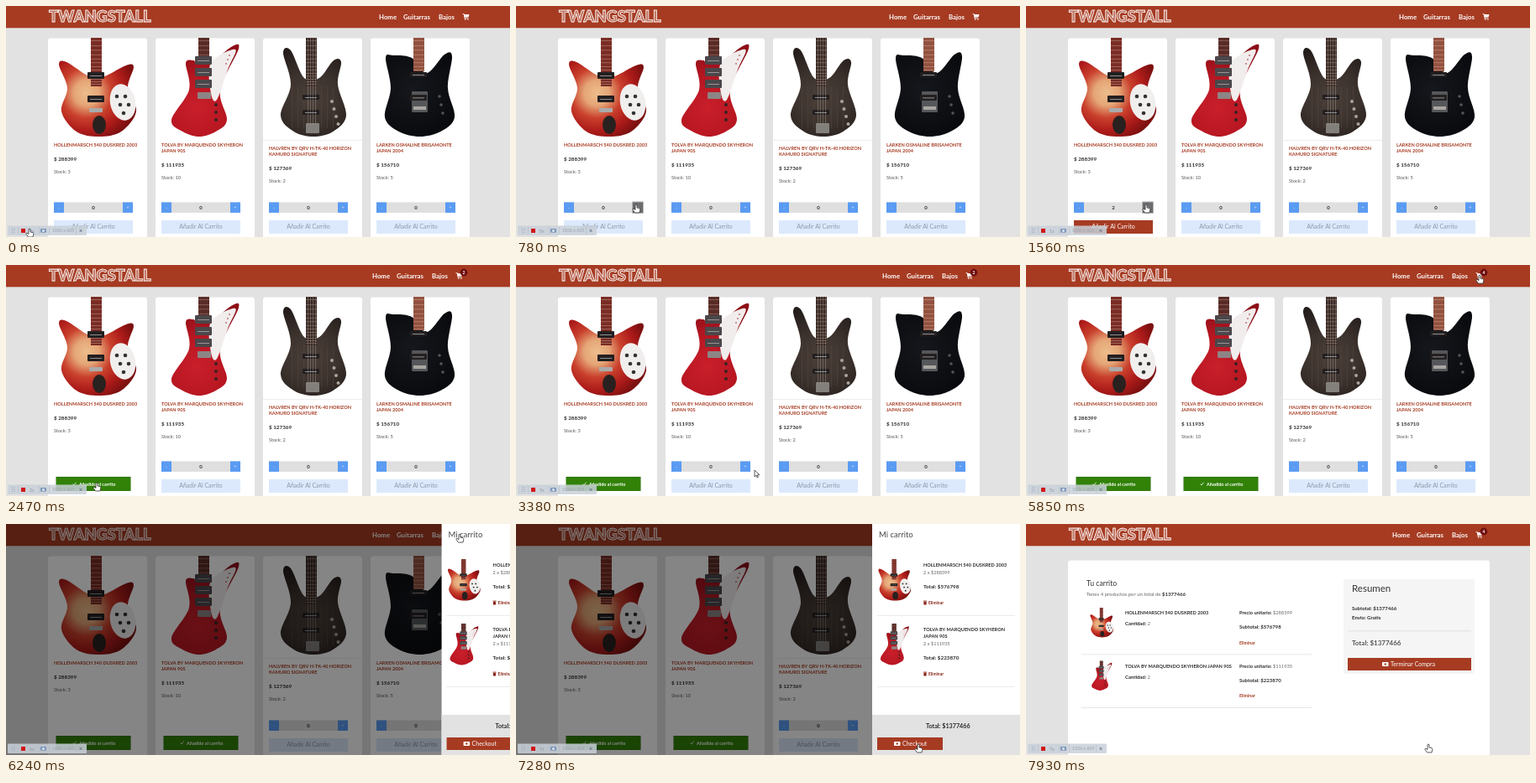
Recreate the animation shown at these times as an HTML page with a canvas. Size 600 by 276 pixels, loop 8 s.

```html
<!DOCTYPE html>
<html lang="es">
<head>
<meta charset="utf-8">
<title>Tienda</title>
<style>
html, body { margin: 0; width: 100%; height: 100%; overflow: hidden; background: #e2e2e2; }
canvas { display: block; width: 600px; height: 276px; }
</style>
</head>
<body>
<canvas id="stage"></canvas>
<script>
const W = 600, H = 276, LOOP = 8000, STEP = 130;
const RED = '#a63b22', BLUE = '#5a9bf2', INK = '#2b2b2b', GREY = '#666';
const OPEN = 6050, CHECKOUT = 7540, DRAWER_W = 176;

const canvas = document.getElementById('stage');
const c = canvas.getContext('2d');
const dpr = window.devicePixelRatio || 1;
canvas.width = W * dpr;
canvas.height = H * dpr;

const products = [
  { name: ['HOLLENMARSCH 540 DUSKRED 2003'], price: 288399, stock: 3, plus: [910, 1430], add: 2340 },
  { name: ['TOLVA BY MARQUENDO SKYHERON', 'JAPAN 90S'], price: 111935, stock: 10, plus: [3640, 3900], add: 4680 },
  { name: ['HALVREN BY QRV H-TK-40 HORIZON', 'KAMURO SIGNATURE'], price: 127369, stock: 2, drop: 4 },
  { name: ['LARKEN OSMALINE BRISAMONTE', 'JAPAN 2004'], price: 156710, stock: 5 }
];
const chosen = products.slice(0, 2);

// Pointer moves: start, end, x, y
const moves = [
  [130, 780, 143, 237], [1690, 2080, 108, 260], [2600, 3380, 284, 245],
  [3380, 3640, 272, 237], [4030, 4420, 255, 260], [4940, 5720, 540, 12],
  [6300, 7150, 479, 263]
];
const hand = new Path2D('M-1 .6Q0-.6 1 .6V4L4 4.6Q5 5 4.8 6.5L4 10H-1.5L-4 6.5Q-4.4 5-3 5.2L-1 6.5Z');
const arrow = new Path2D('M0 0V8L2 6.2L3.2 9L4.4 8.5L3.2 5.8H5.8Z');

const mix = (a, b, p) => a + (b - a) * p;

function ease(t, start, length) {
  const p = Math.min(1, Math.max(0, (t - start) / length));
  return p * p * (3 - 2 * p);
}

function rect(x, y, w, h, fill, r = 0) {
  c.fillStyle = fill;
  c.beginPath();
  c.roundRect(x, y, w, h, r);
  c.fill();
}

function oval(x, y, rx, ry, fill, turn = 0) {
  c.fillStyle = fill;
  c.beginPath();
  c.ellipse(x, y, rx, ry, turn, 0, 7);
  c.fill();
}

const dot = (x, y, r, fill) => oval(x, y, r, r, fill);

function dots(n, x, y, dx, dy, r, fill) {
  for (let i = 0; i < n; i++) dot(x + i * dx, y + i * dy, r, fill);
}

function text(s, x, y, size, fill = INK, weight = 400, align = 'left') {
  c.font = `${weight} ${size}px Lato, sans-serif`;
  c.textAlign = align;
  c.fillStyle = fill;
  c.fillText(s, x, y);
  return c.measureText(s).width;
}

function pair(label, value, x, y, size, fill = GREY, weight = 400) {
  const w = text(label + ' ', x, y, size, INK, 700);
  text(value, x + w, y, size, fill, weight);
}

// Closed smooth curve through points
function blob(pts, fill) {
  const at = i => pts[(i + pts.length) % pts.length];
  c.beginPath();
  c.moveTo(...pts[0]);
  pts.forEach((b, i) => {
    const a = at(i - 1), d = at(i + 1), e = at(i + 2);
    c.bezierCurveTo(b[0] + (d[0] - a[0]) / 6, b[1] + (d[1] - a[1]) / 6,
      d[0] - (e[0] - b[0]) / 6, d[1] - (e[1] - b[1]) / 6, ...d);
  });
  c.fillStyle = fill;
  c.fill();
}

// Guitar outline from its horns, waist, lower bout and neck heel
function body({ horns: [l, r], waist: [wl, wr, wy], bout: [bl, br, by], heel: [hl, hr] }, fill) {
  const base = 118, inset = (br - bl) * .2;
  blob([
    l, [wl, wy], [bl, by], [bl + inset, base - 6], [(bl + br) / 2, base],
    [br - inset, base - 6], [br, by], [wr, wy], r,
    [r[0] - 9, r[1] - 2], [67, hr], [49, hl], [l[0] + 9, l[1] - 3]
  ], fill);
}

function glow(x, y, r, ...colors) {
  const g = c.createRadialGradient(x, y, 0, x, y, r);
  colors.forEach((col, i) => g.addColorStop(i / (colors.length - 1), col));
  return g;
}

function neck(end, fill, fret) {
  rect(51, 0, 13, end, fill);
  for (let y = 3, gap = 6; y < end; y += gap, gap *= .94) rect(51, y, 13, .5, fret);
}

function pickup(y, h = 8, fill = '#231f20') {
  rect(47, y, 20, h, fill, 1);
  rect(50, y + h / 2, 14, .8, '#aaa');
}

const guitars = [
  () => {
    body({ horns: [[13, 32], [102, 35]], waist: [23, 95, 60], bout: [16, 105, 88], heel: [46, 46] },
      glow(46, 66, 60, '#edbd8b', '#e5a577', '#c9402c', '#ae1c1a', '#7d1010'));
    oval(89, 77, 15, 22, '#f1eeee', -.2);
    neck(58, '#7a2c25', '#c09a88');
    pickup(41);
    pickup(69);
    rect(49, 84, 16, 5, '#aaa', 1);
    oval(61, 104, 8, 11, '#29211f');
    dots(3, 82, 70, 4, 10, 2.3, '#333');
    dots(2, 92, 70, 4, 10, 2.3, '#333');
  },
  () => {
    body({ horns: [[36, 30], [99, 13]], waist: [40, 77, 62], bout: [19, 85, 98], heel: [29, 29] },
      glow(50, 84, 70, '#c91f2b', '#b81722', '#8d0e17'));
    blob([[66, 30], [95, 14], [86, 38], [73, 74], [66, 66]], '#f1eded');
    neck(26, '#5a2b26', '#a98a80');
    for (let y = 22; y < 60; y += 14) pickup(y, 10, '#4b474a');
    rect(50, 65, 16, 8, '#8d8585', 1);
    dots(3, 72, 80, 0, 9, 2, '#3a2222');
    dots(3, 88, 21, -2, 5, .9, '#b66');
  },
  () => {
    body({ horns: [[24, 18], [93, 29]], waist: [33, 89, 56], bout: [21, 99, 93], heel: [48, 48] },
      glow(57, 72, 62, '#4a3f39', '#3d332e', '#241d1b'));
    for (let x = 34; x < 90; x += 7) rect(x, 58, .6, 50, '#51453e');
    neck(58, '#3a2925', '#9b8a7d');
    pickup(68, 6);
    pickup(86, 6);
    rect(51, 102, 16, 12, '#83807c', 1);
    for (let x = 53; x < 64; x += 3) rect(x, 0, .4, 104, '#a59c92');
    dots(4, 82, 76, 2.5, 9, 2, '#aaa49c');
  },
  () => {
    body({ horns: [[18, 24], [97, 22]], waist: [24, 92, 60], bout: [17, 100, 95], heel: [24, 42] },
      glow(50, 62, 70, '#15171c', '#07080b'));
    neck(40, '#935241', '#d3a58a');
    pickup(41, 6);
    rect(49, 64, 19, 25, '#55575a', 1);
    pickup(68, 7);
    rect(51, 82, 15, 4, '#a9a7a2');
    dots(3, 82, 70, 2, 10, 1.8, '#53555a');
  }
];

function guitar(i, x, y, s = 1) {
  c.save();
  c.translate(x, y);
  c.scale(s, s);
  guitars[i]();
  c.restore();
}

function drawNav(t) {
  rect(0, 0, W, 26.3, RED);
  text('TWANGSTALL', 51, 19, 18.2, 'rgba(255,255,255,.3)', 900);
  c.strokeStyle = '#fff';
  c.lineWidth = .8;
  c.strokeText('TWANGSTALL', 51, 19);

  const count = chosen.filter(p => t >= p.add).length * 2;
  const x = count ? 436 : 444;
  text('Home', x, 15.5, 7.8, '#fff', 700);
  text('Guitarras', x + 29, 15.5, 7.8, '#fff', 700);
  text('Bajos', x + 71, 15.5, 7.8, '#fff', 700);
  c.save();
  c.translate(x + 99.5, 9);
  c.fillStyle = '#fff';
  c.fill(new Path2D('M0 0H1.8L2.1 1H8L7 4.6H2.9L3.1 5.4H7V6.2H2.3L1.2 .8H0Z'));
  dots(2, 3.2, 7, 3.2, 0, .8, '#fff');
  c.restore();
  if (count) {
    dot(545, 9, 4.4, '#6f0e10');
    text(count, 545, 10.8, 5, '#fff', 700, 'center');
  }
}

function drawAdded(x) {
  rect(x, 253, 89, 17, '#276a05');
  rect(x + .5, 253.5, 88, 16, '#318207');
  c.strokeStyle = '#fff';
  c.lineWidth = .8;
  c.stroke(new Path2D(`M${x + 20} 261.6l1.4 1.5 2.6-3.4`));
  text('Añadido al carrito', x + 27.5, 263.5, 5.5, '#fff', 700);
}

function drawBuy(p, x, t) {
  const qty = (p.plus || []).filter(k => t >= k).length;
  const focus = p.plus && t >= p.plus[0] - STEP;
  rect(x, 234.5, 94, 12.5, '#dfdfdf');
  rect(x, 234.5, 12, 12.5, BLUE);
  if (focus) rect(x + 81, 233.5, 14, 14.5, '#b5b5b5', 1);
  rect(x + 82, 234.5, 12, 12.5, focus ? '#6d6b6d' : BLUE);
  text('-', x + 6, 242.6, 6, '#cfe2ff', 400, 'center');
  text('+', x + 88, 242.8, 6, '#cfe2ff', 400, 'center');
  text(qty, x + 47, 243, 6, INK, 700, 'center');
  rect(x, 256, 94, 16, qty ? RED : '#dce9fc');
  text('Añadir Al Carrito', x + 47, 266.3, 7, qty ? '#fff' : '#8b97a8', 400, 'center');
}

function drawCard(p, i, t) {
  const x = 50 + i * 128, l = x + 7;
  rect(x, 38.5, 118, 250, '#fff', 3);
  guitar(i, x, 38);
  let y = 168;
  if (p.drop) {
    rect(x, 160, 118, .7, '#e6e6e6');
    y += p.drop;
  }
  p.name.forEach((s, k) => text(s, l, y + k * 7, 5.6, RED, 700));
  y += p.name.length * 7 + 9.5;
  text('$ ' + p.price, l, y, 6.3, INK, 700);
  text('Stock: ' + p.stock, l, y + 15.7, 5.6, '#555');
  if (t >= p.add) drawAdded(x + 9.5);
  else drawBuy(p, l, t);
}

function payButton(label, x, y, w, h, labelX) {
  rect(x, y, w, h, RED);
  rect(labelX - 10, y + 5, 7.5, 5, '#fff', .7);
  dot(labelX - 6.25, y + 7.5, 1.2, RED);
  text(label, labelX, y + 10, 7, '#fff');
}

function drawCartPage() {
  rect(50, 43.5, 502, 250, '#fff', 3);
  text('Tu carrito', 72, 74, 8.7, '#333');
  const w = text('Tenes 4 productos por un total de ', 72, 86, 6, GREY);
  text('$1377466', 72 + w, 86, 6, INK, 700);
  chosen.forEach((p, i) => {
    const y = 108 + i * 63.5;
    guitar(i, 72.5, y - 8, .3);
    text(p.name.join(' '), 118, y, 5.6, INK, 700);
    pair('Cantidad:', 2, 118, y + 13, 5.9);
    pair('Precio unitario:', '$' + p.price, 254, y, 5.7);
    pair('Subtotal:', '$' + p.price * 2, 254, y + 17, 6, INK, 700);
    text('Eliminar', 254, y + 35.5, 5.2, RED, 700);
    rect(66, y + 47.5, 274, .7, '#dedede');
  });
  rect(378, 66, 156, 113, '#f5f5f5', 1);
  text('Resumen', 388, 81, 11.5, '#333');
  text('Subtotal: $1377466', 388, 102.5, 6, INK, 700);
  text('Envio: Gratis', 388, 114.3, 6.1, INK, 700);
  rect(383, 127.5, 147, .8, '#d8d8d8');
  text('Total: $1377466', 388, 145, 8, '#555', 700);
  payButton('Terminar Compra', 383, 160, 147, 15, 434);
}

function drawDrawer(p) {
  const x = W - DRAWER_W * p, l = x + 61;
  rect(x, 0, DRAWER_W, H, '#fff');
  text('Mi carrito', x + 8, 16, 9.5, '#444');
  chosen.forEach((item, i) => {
    let y = 51 + i * 77;
    guitar(i, x + 2, y - 9, .42);
    item.name.forEach((s, k) => text(s, l, y + k * 8, 5.6, INK, 700));
    y += item.name.length * 8;
    text('2 x $' + item.price, l, y + 1, 5.6, GREY);
    text('Total: $' + item.price * 2, l, y + 18.3, 6.3, INK, 700);
    rect(l, y + 32.6, 4, 1, '#8b2619');
    rect(l + .4, y + 34, 3.2, 3.6, '#8b2619', .4);
    text('Eliminar', l + 6, y + 37, 5, '#8b2619', 700);
    rect(x + 6, y + 50, DRAWER_W - 12, .7, '#e4e4e4');
  });
  rect(x, 228, DRAWER_W, 48, '#e2e2e2');
  text('Total: $1377466', x + 64, 243.5, 7.2, INK, 700);
  payButton('Checkout', x + 6, 255, 78, 15, x + 36);
}

function drawRecorder(t) {
  rect(2, 262.5, 94, 11.5, 'rgba(201,208,217,.85)', 1);
  for (const x of [7.5, 10]) dots(3, x, 265.8, 0, 2.4, .6, '#8da4c0');
  for (const x of [14, 39.5, 51.5, 83]) rect(x, 264, .6, 8.5, '#b1bac6');
  rect(18, 266, 5, 5, '#d01818');
  text(Math.floor(t / 1000) + 's', 28, 270.5, 5.5, '#8e98a6');
  rect(41, 266, 7, 4.8, '#7d98bd', 1);
  dot(44.5, 268.4, 1.5, '#dfe5ec');
  text('1036 x 605', 55, 270.4, 5.2, '#98a2b0');
  text('×', 89, 270.8, 7, '#5f6f88', 700, 'center');
}

// A hand while resting on a control, an arrow on the way
function drawPointer(t) {
  let x = 28, y = 266, shape = hand;
  for (const [start, end, toX, toY] of moves) {
    const p = ease(t, start, end - start);
    x = mix(x, toX, p);
    y = mix(y, toY, p);
    if (t > start && t < end || t === 3380) shape = arrow;
  }
  c.save();
  c.translate(x, y);
  c.fillStyle = '#fff';
  c.strokeStyle = '#333';
  c.lineWidth = .8;
  c.fill(shape);
  c.stroke(shape);
  c.restore();
}

function draw(t) {
  c.setTransform(dpr, 0, 0, dpr, 0, 0);
  rect(0, 0, W, H, '#e2e2e2');
  drawNav(t);
  if (t < CHECKOUT) products.forEach((p, i) => drawCard(p, i, t));
  else drawCartPage();

  const leave = ease(t, CHECKOUT, 320);
  const shade = ease(t, OPEN, 190) - leave;
  const slide = ease(t, OPEN, 400) - leave;
  if (shade > 0) rect(0, 0, W, H, `rgba(0,0,0,${.48 * shade})`);
  if (slide > 0) drawDrawer(slide);
  drawRecorder(t);
  drawPointer(t);
}

function tick(now) {
  draw(Math.floor(now % LOOP / STEP) * STEP);
  requestAnimationFrame(tick);
}
requestAnimationFrame(tick);
</script>
</body>
</html>
```
